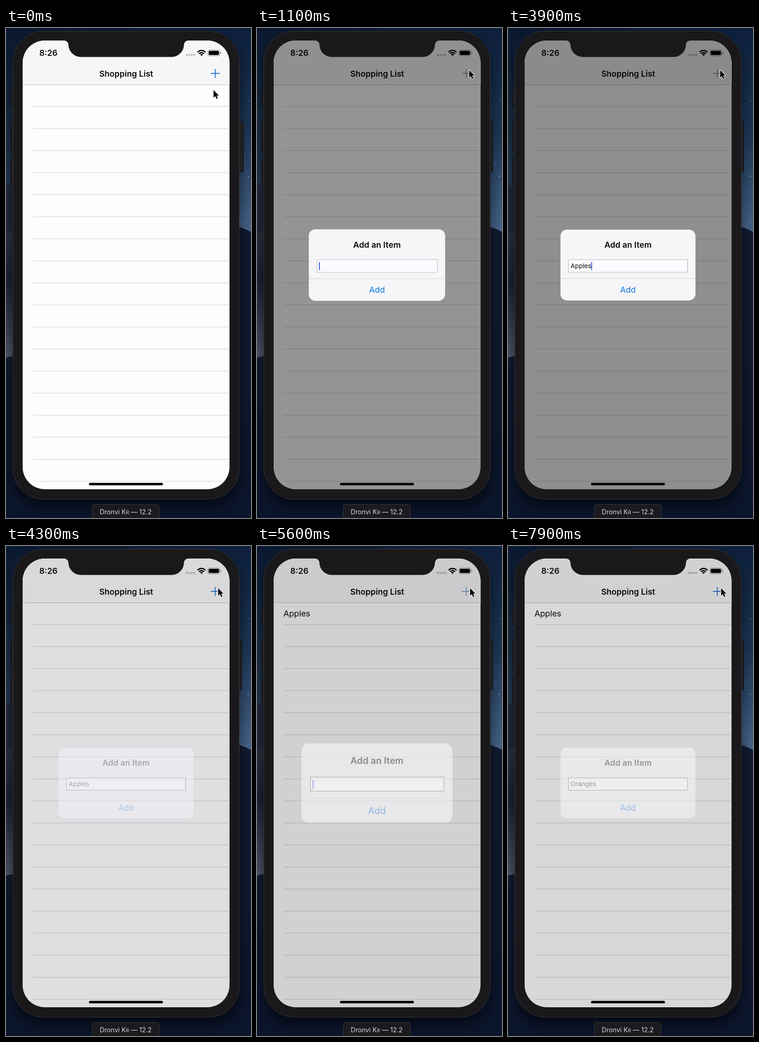
An HTML page for the animation above (8000 ms loop, 530x1057 px).

```html
<!DOCTYPE html>
<html lang="en">
<head>
<meta charset="utf-8">
<title>Shopping List</title>
<style>
  html, body { margin: 0; width: 100%; height: 100%; overflow: hidden; background: #0a1225; }
  svg { display: block; width: 530px; height: 1057px; }
  text { font-family: Inter, "Liberation Sans", sans-serif; font-size: 17.7px; fill: #0b0a0c; white-space: pre; }
  .bold { font-weight: 600; }
  .mid { text-anchor: middle; }
  #shadow { filter: blur(14px); }
</style>
</head>
<body>
<svg viewBox="0 0 530 1057" xmlns="http://www.w3.org/2000/svg">
  <defs>
    <linearGradient id="skyL" x2="0" y2="1">
      <stop offset="0" stop-color="#0b1930"/>
      <stop offset="1" stop-color="#23384f"/>
    </linearGradient>
    <linearGradient id="duneL" x2="0" y2="1">
      <stop offset="0" stop-color="#2c3242"/>
      <stop offset=".4" stop-color="#1a2132"/>
      <stop offset="1" stop-color="#50576a"/>
    </linearGradient>
    <linearGradient id="skyR" x2="0" y2="1">
      <stop offset="0" stop-color="#0d1f3b"/>
      <stop offset=".5" stop-color="#1c3553"/>
      <stop offset="1" stop-color="#47648a"/>
    </linearGradient>
    <linearGradient id="sand" x2="0" y2="1">
      <stop offset="0" stop-color="#111a2f"/>
      <stop offset="1" stop-color="#0b152c"/>
    </linearGradient>
    <clipPath id="screenClip"><rect x="36" y="27" width="447.5" height="968" rx="48"/></clipPath>
  </defs>

  <!-- desktop -->
  <rect width="530" height="1057" fill="#0b152c"/>
  <rect width="265" height="350" fill="url(#skyL)"/>
  <path d="M0 338Q10 339 20 345V450H0Z" fill="#222839"/>
  <path d="M0 442Q10 437 20 433V715H0Z" fill="url(#duneL)"/>
  <path d="M0 711Q10 708 20 707V1057H0Z" fill="url(#sand)"/>
  <rect x="265" width="265" height="440" fill="url(#skyR)"/>
  <path d="M500 428Q516 432 530 440V640H500Z" fill="#111a30"/>
  <path d="M500 624Q516 627 530 633V1057H500Z" fill="url(#sand)"/>
  <rect id="shadow" x="15" y="22" width="490" height="1010" rx="64" opacity=".55"/>
  <g fill="#b9c8dc">
    <circle cx="524" cy="320" r="1"/><circle cx="526" cy="157" r=".8"/>
    <circle cx="514.5" cy="293" r=".7"/><circle cx="12" cy="178" r=".6"/>
  </g>

  <!-- device -->
  <g fill="#201f21" stroke="#08080a">
    <rect x="10.5" y="134.5" width="10" height="37" rx="2"/>
    <rect x="10.5" y="202.5" width="10" height="65" rx="2"/>
    <rect x="10.5" y="277.5" width="10" height="65" rx="2"/>
    <rect id="power" x="498.5" y="202.5" height="108" rx="2"/>
  </g>
  <rect x="15" y="6.5" width="489.5" height="1010" rx="66" fill="#1a181a" stroke="#373639"/>

  <g clip-path="url(#screenClip)">
    <rect x="36" y="27" width="448" height="969" fill="#fefcff"/>
    <rect x="36" y="27" width="448" height="95" fill="#f6f5f8"/>
    <rect x="36" y="122" width="448" height="1" fill="#bdbcbf"/>
    <g id="lines" fill="#cecdd1"></g>
    <text x="72" y="60" class="bold">8:26</text>
    <text x="260" y="105" class="bold mid">Shopping List</text>
    <text id="row" x="57.3" y="152">Apples</text>
    <path d="M391 58H408" stroke="#bcbbbe" stroke-width="4.4" stroke-linecap="round" stroke-dasharray="0 5.45"/>
    <g fill="none" stroke="#000" stroke-width="2.6">
      <path d="M414.4 52.2Q423 44.6 431.6 52.2"/>
      <path d="M417.5 55.5Q423 50.6 428.5 55.5"/>
    </g>
    <path d="M420 57.3Q423 54.8 426 57.3L423 60.4Z"/>
    <rect x="436.6" y="47.5" width="26" height="12.6" rx="3.7" fill="none" stroke="#000" stroke-opacity=".45"/>
    <rect x="438.5" y="49.3" width="22.2" height="9" rx="2"/>
    <path d="M464 51.7q1.8 .6 1.8 2.2t-1.8 2.2z" fill-opacity=".5"/>
    <path id="plus" d="M443 97.8H462.3M452.6 88.2V107.4" fill="none" stroke-width="1.7"/>
    <rect id="dim" x="36" y="27" width="448" height="969"/>
    <path d="M126 26V27A9 9 0 0 1 135 36A27 27 0 0 0 162 62.5H358A27 27 0 0 0 385 36A9 9 0 0 1 394 27V26Z" fill="#1a181a"/>
    <rect x="179.5" y="981.3" width="160" height="5.3" rx="2.65"/>
  </g>

  <!-- dialog -->
  <g id="alert">
    <rect id="panel" x="113.5" y="435" width="292" height="152.7" rx="14" fill="#f6f5f8"/>
    <rect id="field" x="131" y="500" width="257.5" height="26.8" fill="none" stroke="#a6a5aa"/>
    <g id="content">
      <rect x="131.5" y="500.5" width="256.5" height="25.8" fill="#fdfbff"/>
      <rect x="113.5" y="540" width="292" height="1" fill="#d3d2d6"/>
      <text x="259.5" y="474" class="bold mid">Add an Item</text>
      <text x="259.5" y="570.8" class="mid" style="fill:#0f74de">Add</text>
      <text id="typed" x="135.6" y="518.3" style="font-size:13.7px"></text>
      <rect id="caret" y="505" width="1.9" height="17" fill="#2f66da"/>
    </g>
  </g>

  <rect x="186.5" y="1027.5" width="145" height="40" rx="5" fill="#1b1a1e" stroke="#38363b"/>
  <text x="259" y="1049" class="mid" style="font-size:14.1px;fill:#dad9dc">Dronvi K<tspan style="font-size:10.5px">R</tspan> — 12.2</text>

  <path id="cursor" d="M0 0V16.2L3.7 12.7L6.3 18.7L9.1 17.5L6.5 11.7H11.5Z" fill="#050505" stroke="#f4f4f6" stroke-width="2" stroke-linejoin="round" paint-order="stroke"/>
</svg>

<script>
const LOOP = 8000, STEP = 100;
const BLUE = [16, 104, 200], GRAY = [150, 150, 156];

// Each visit to the dialog; bend > 1 slows the typing towards the end
const visits = [
  { open: 677, close: 4070, word: "Apples", from: 2100, to: 3900, bend: 3 },
  { open: 5477, close: 7700, word: "Oranges", from: 6600, to: 7500, bend: 1 }
];

const $ = id => document.getElementById(id);
const set = (id, attrs) => {
  for (const k in attrs) $(id).setAttribute(k, attrs[k]);
};
const ramp = (t, from, length) => Math.min(1, Math.max(0, (t - from) / length));
const smooth = x => x * x * (3 - 2 * x);
const mix = (a, b, p) => `rgb(${a.map((v, i) => Math.round(v + (b[i] - v) * p))})`;

// Critically damped spring from 0 to 1
function spring(t, from) {
  const x = Math.max(0, t - from) * .0112;
  return 1 - (1 + x) * Math.exp(-x);
}

const keyTime = (v, i) => v.from + (v.to - v.from) * (i / (v.word.length - 1)) ** v.bend;

for (let i = 0; i < 18; i++) {
  $("lines").insertAdjacentHTML("beforeend", `<rect x="57.5" y="${168.9 + i * 47.56}" width="427" height="1"/>`);
}

function drawAlert(v, t) {
  const leaving = t > v.close;
  const p = leaving ? 1 - spring(t, v.close) : spring(t, v.open);
  const scale = leaving ? 1 : 1.2 - .2 * p;

  set("dim", { opacity: .437 * p });
  set("alert", {
    transform: `translate(259.5 511.4) scale(${scale}) translate(-259.5 -511.4)`,
    visibility: p > .01 ? "visible" : "hidden"
  });
  set("panel", { opacity: 1 - (1 - p) ** 2 });
  set("field", { opacity: Math.min(1, p * 3) });
  set("content", { opacity: Math.min(1, p * 1.06) });

  const keys = [...v.word].map((_, i) => keyTime(v, i)).filter(k => k <= t);
  $("typed").textContent = v.word.slice(0, keys.length);
  const idle = Math.max(0, t - Math.max(v.open + 400, ...keys));
  set("caret", {
    x: 135.3 + $("typed").getComputedTextLength(),
    opacity: !leaving && idle % 800 < 450 ? 1 : 0
  });

  const press = v.open - 100;
  set("plus", {
    stroke: mix(BLUE, GRAY, leaving ? 0 : p),
    opacity: t < press ? 1 : .35 + .65 * ramp(t, press, 400)
  });
}

function draw(t) {
  drawAlert(visits[t < 5000 ? 0 : 1], t);
  set("row", { opacity: ramp(t, 4500, 400) });
  set("power", { width: 15 - 4 * ramp(t, 0, 300) });

  const move = smooth(ramp(t, 0, 500));
  const x = 449 + 10 * move + 2 * ramp(t, 5100, 100);
  set("cursor", { transform: `translate(${x} ${134 - 43 * move})` });
}

const start = performance.now();
function tick() {
  const ms = (performance.now() - start) % LOOP;
  draw(Math.floor(ms / STEP) * STEP);
  requestAnimationFrame(tick);
}
tick();
</script>
</body>
</html>
```
